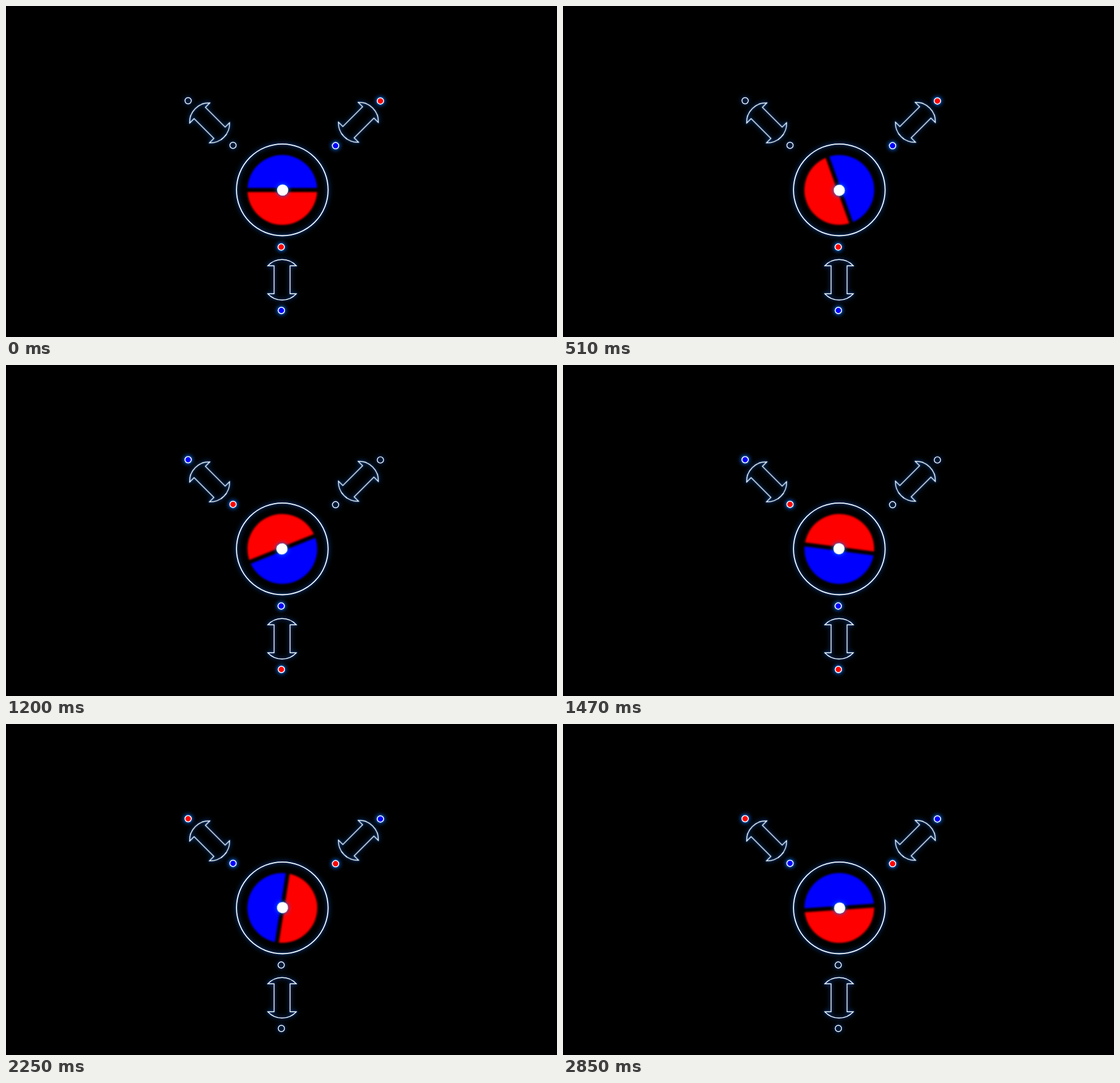
Recreate the animation shown at these times as an HTML page. Size 966 by 580 pixels, loop 2880 ms.

```html
<!DOCTYPE html>
<html lang="en">
<head>
<meta charset="utf-8">
<title>Three-coil motor</title>
<style>
  html, body { margin: 0; width: 100%; height: 100%; overflow: hidden; background: #000; }
  svg { display: block; }
</style>
</head>
<body>
<svg width="966" height="580" viewBox="0 0 966 580">
  <defs>
    <filter id="glow" filterUnits="userSpaceOnUse" x="-500" y="-500" width="1966" height="1580" color-interpolation-filters="sRGB">
      <feGaussianBlur in="SourceAlpha" stdDeviation="4.5" result="wide"/>
      <feGaussianBlur in="SourceAlpha" stdDeviation="1.6" result="near"/>
      <feFlood flood-color="#0a78ff"/>
      <feComposite in2="wide" operator="in" result="halo"/>
      <feFlood flood-color="#0a78ff" flood-opacity=".5"/>
      <feComposite in2="near" operator="in" result="rim"/>
      <feMerge>
        <feMergeNode in="halo"/>
        <feMergeNode in="rim"/>
        <feMergeNode in="SourceGraphic"/>
      </feMerge>
    </filter>
    <filter id="soft" filterUnits="userSpaceOnUse" x="-80" y="-80" width="160" height="160" color-interpolation-filters="sRGB">
      <feGaussianBlur stdDeviation="1.5"/>
    </filter>
    <path id="coil" d="M-25-24.5A33.9 33.9 0 0 1 25-24.5H14V24.5H25A33.9 33.9 0 0 1-25 24.5H-14V-24.5Z"/>
  </defs>
  <rect width="966" height="580"/>
  <g fill="none" stroke="#fff" stroke-width="1.4" filter="url(#glow)">
    <circle cx="484.4" cy="322.2" r="80.3" stroke-width="1.8"/>
    <use href="#coil" transform="translate(357 204.8) rotate(-45)"/>
    <use href="#coil" transform="translate(617.8 203.8) rotate(45)"/>
    <use href="#coil" transform="translate(484 479.7)"/>
    <g id="idle"></g>
  </g>
  <g id="lit" stroke="#fff" stroke-width="1.5"></g>
  <g transform="translate(484.4 322.3)">
    <g id="rotor">
      <g filter="url(#soft)">
        <path fill="#00f" d="M-61-3.6A61.1 61.1 0 0 1 61-3.6Z"/>
        <path fill="#f00" d="M-61 3.6A61.1 61.1 0 0 0 61 3.6Z"/>
      </g>
      <circle cx=".6" cy=".2" r="9.8" fill="#fff" filter="url(#glow)"/>
    </g>
  </g>
</svg>
<script>
const LOOP = 2880, STEP = 30;
const $ = id => document.getElementById(id);

// Each coil: [inner x, y, outer x, y]
const coils = [
  [398, 244.2, 319.3, 166],
  [577.8, 244.8, 656.4, 166.4],
  [482.5, 422.3, 482.8, 533.5]
];
// Polarity per coil: 1 = blue inside, -1 = red inside, 0 = idle
const phases = [[0, 1, -1], [-1, 0, 1], [1, -1, 0]];
const turns = [0, 132, 236.5, 360];

const dot = (x, y, fill) => `<circle cx="${x}" cy="${y}" r="5.5" fill="${fill}"/>`;
const pole = sign => sign > 0 ? '#00f' : '#f00';

$('idle').innerHTML = coils.map(([a, b, c, d]) => dot(a, b, 'none') + dot(c, d, 'none')).join('');
$('lit').innerHTML = phases.map(phase => '<g filter="url(#glow)">' +
  coils.map(([a, b, c, d], i) => phase[i]
    ? dot(a, b, pole(phase[i])) + dot(c, d, pole(-phase[i])) : '').join('') + '</g>').join('');
const layers = [...$('lit').children];

function draw(now) {
  const t = Math.floor(now % LOOP / STEP) * STEP;
  const third = LOOP / 3, i = Math.floor(t / third), part = t / third - i;
  const angle = turns[i] + (turns[i + 1] - turns[i]) * part;
  $('rotor').setAttribute('transform', `rotate(${angle})`);

  const blend = Math.min(1, Math.max(0, (t - 1590) / 90));
  const power = t < 960 ? [1, 0, 0] : [0, 1 - blend, blend];
  layers.forEach((layer, n) => layer.setAttribute('opacity', power[n]));
}

const start = performance.now();
function tick() {
  draw(performance.now() - start);
  requestAnimationFrame(tick);
}
tick();
</script>
</body>
</html>
```
